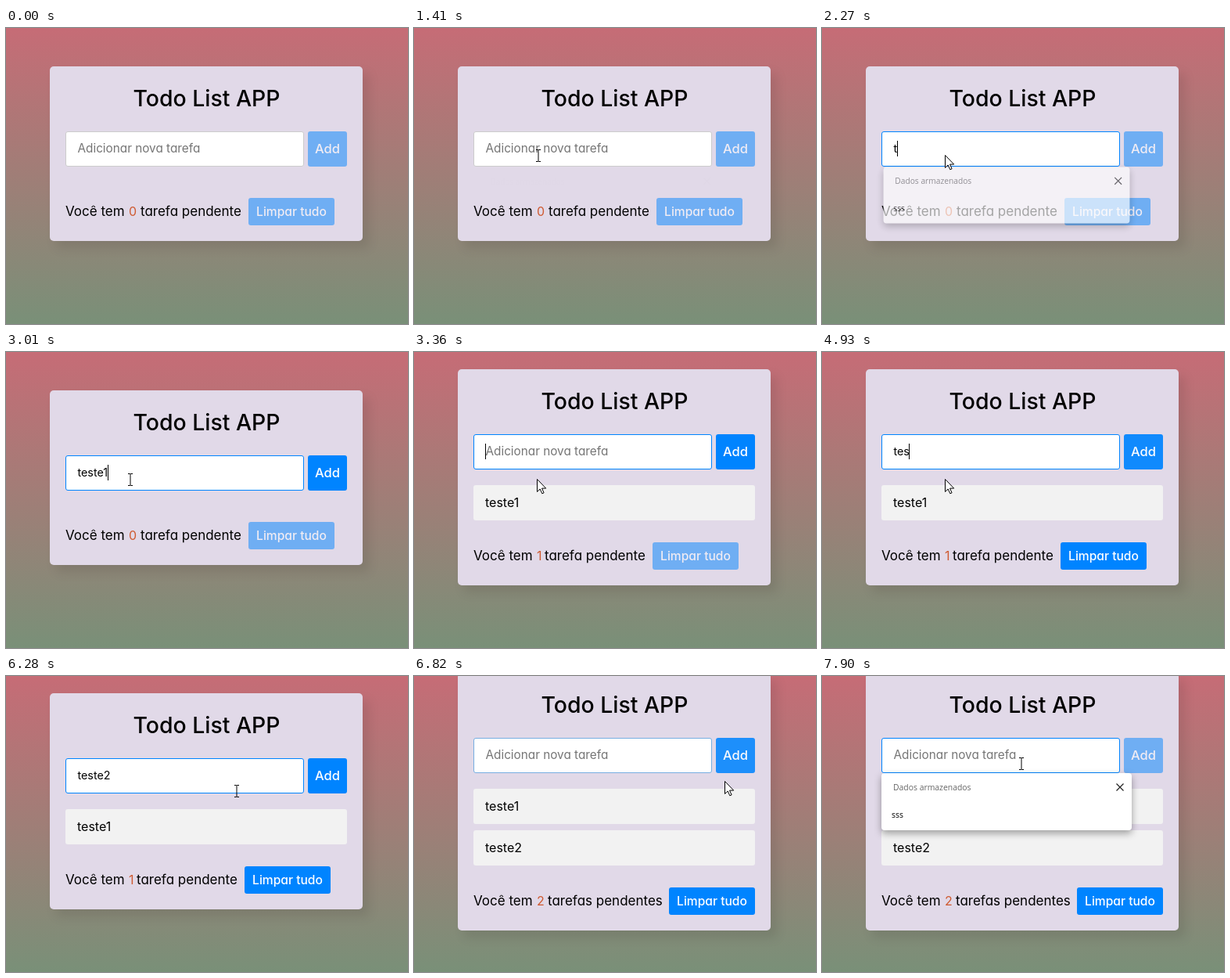
Write an HTML page that moves like this. It is 514 by 378 pixels and loops after 8 s.

```html
<!DOCTYPE html>
<html lang="pt-BR">
<head>
<meta charset="utf-8">
<title>Todo List APP</title>
<style>
  html, body { margin: 0; width: 100%; height: 100%; overflow: hidden; }
  svg { display: block; width: 514px; height: 378px; background: linear-gradient(#c66c76, #799078); }
  /* cv11 is the single-storey "a" */
  text { font: 17px Inter, sans-serif; font-optical-sizing: none; font-feature-settings: "cv11"; white-space: pre; }
  .panel { fill: #e1d9e8; filter: drop-shadow(8px 9px 6.5px rgba(0, 0, 0, .09)); }
  .title { font-size: 28.4px; font-weight: 500; text-anchor: middle; }
  .hint { font-size: 15.3px; fill: #757575; }
  .typed { font-size: 14.3px; }
  .item rect { fill: #f2f2f2; }
  .item text { font-size: 16px; }
  .btn rect { fill: #0084ff; }
  .btn text { fill: #fff; text-anchor: middle; font-size: 16.5px; font-weight: 500; }
  .btn .small { font-size: 15.6px; }
  #footer .count { fill: #cf5a30; font-size: 16px; }
  .menu { fill: #fff; filter: drop-shadow(0 4px 5px rgba(0, 0, 0, .35)); }
  #popup text { font: 10.4px "Open Sans", sans-serif; }
  #popup .label { fill: #666; }
  #arrow, #hand { fill: #fff; stroke: #000; stroke-linejoin: round; }
  #beam { fill: none; stroke: #000; }
</style>
</head>
<body>
<svg viewBox="0 0 514 378">
  <g id="card">
    <rect id="panel" class="panel" x="56" width="400" rx="5"/>
    <text class="title" x="256.5" y="51">Todo List APP</text>
    <rect id="field" x="76.5" y="83.5" width="304" height="44" rx="2.5" fill="#fff"/>
    <text id="hint" class="hint" x="91.5" y="110">Adicionar nova tarefa</text>
    <text id="typed" class="typed" x="91.5" y="110"></text>
    <rect id="caret" y="95" width="1" height="20"/>
    <g id="add" class="btn">
      <rect x="386" y="83" width="50" height="45" rx="3"/>
      <text x="411" y="111">Add</text>
    </g>
    <g id="item1" class="item" transform="translate(76 148)">
      <rect width="360" height="45" rx="3"/><text x="15" y="28">teste1</text>
    </g>
    <g id="item2" class="item" transform="translate(76 201)">
      <rect width="360" height="45" rx="3"/><text x="15" y="28">teste2</text>
    </g>
    <g id="footer">
      <text x="76" y="23">Você tem</text>
      <text id="count" class="count" x="157" y="23"></text>
      <text id="pending" y="23"></text>
      <g id="clear" class="btn">
        <rect width="110" height="35" rx="3"/>
        <text class="small" x="55" y="23">Limpar tudo</text>
      </g>
    </g>
    <g id="popup">
      <rect class="menu" x="76" y="128" width="320" height="73" rx="4"/>
      <text class="label" x="91" y="150">Dados armazenados</text>
      <text x="89" y="185">sss</text>
      <path d="M376.5 141.5l9 9m0-9l-9 9" stroke="#222" stroke-width="1.2"/>
    </g>
  </g>
  <g id="cursor">
    <path id="arrow" d="M.5.5v16l3.7-3.5 2.6 5.8 2.3-1-2.6-5.7h5.2z"/>
    <path id="beam" d="M-1-6.5h2.5l.5.5.5-.5h2.5M2-6v14M-1 8.5h2.5l.5-.5.5.5h2.5"/>
    <path id="hand" d="M-1 1.5q1.5-2 3 0v6q5-1 8 2v5l-2 5h-7l-6-8q1-2 4 0z"/>
  </g>
</svg>
<script>
const LOOP = 8000, BLINK = 520;
const SUBMITS = [3360, 6765];
const WORDS = [
  { text: 'teste1', keys: [2210, 2340, 2410, 2540, 2680, 3010] },
  { text: 'teste2', keys: [4580, 4790, 4930, 5000, 5070, 5600] }
];
const FOCUS = 1410, BLUR = 6720, REFOCUS = 7370;
const CARET_STARTS = [FOCUS + 80, ...WORDS[0].keys, ...WORDS[1].keys, REFOCUS + 10];
const FOOTERS = [
  { tail: 172, button: 310, label: 'tarefa pendente' },
  { tail: 167, button: 305, label: 'tarefa pendente' },
  { tail: 171, button: 326, label: 'tarefas pendentes' }
];
const PATH = [
  [330, 312, 372], [870, 154, 166], [1010, 157, 162],
  [6020, 157, 162], [6500, 397, 134], [6830, 397, 134], [7170, 253, 111]
];

const $ = id => document.getElementById(id);
const set = (id, attrs) => {
  for (const key in attrs) $(id).setAttribute(key, attrs[key]);
};
const show = (id, on) => { $(id).style.display = on ? '' : 'none'; };
const clamp = v => Math.min(1, Math.max(0, v));
const mix = (a, b, p) => a + (b - a) * p;
const bezier = (a, b, s) => 3 * a * s * (1 - s) ** 2 + 3 * b * s * s * (1 - s) + s ** 3;

// CSS "ease": solve x(s) = p, return y(s)
function ease(p) {
  p = clamp(p);
  if (p === 0 || p === 1) return p;
  let low = 0, high = 1;
  for (let i = 0; i < 20; i++) {
    const mid = (low + high) / 2;
    if (bezier(.25, .25, mid) < p) low = mid; else high = mid;
  }
  return bezier(.1, 1, low);
}
const pulse = (t, on, off, dur = 300, curve = ease) =>
  curve((t - on) / dur) - curve((t - off) / dur);

function cursorAt(t) {
  let i = 0;
  while (i < PATH.length - 2 && t >= PATH[i + 1][0]) i++;
  const [t0, x0, y0] = PATH[i], [t1, x1, y1] = PATH[i + 1];
  const p = clamp((t - t0) / (t1 - t0)), s = p * p * (3 - 2 * p);
  return [mix(x0, x1, s), mix(y0, y1, s)];
}

function typedAt(t, done) {
  const word = WORDS[done];
  return word ? word.text.slice(0, word.keys.filter(k => k <= t).length) : '';
}

function drawField(t, done) {
  const text = typedAt(t, done);
  $('typed').textContent = text;
  show('hint', !text);
  const glow = pulse(t, FOCUS, BLUR) + ease((t - REFOCUS) / 250);
  const rgb = [mix(204, 0, glow), mix(204, 132, glow), mix(204, 255, glow)].map(Math.round);
  set('field', { stroke: `rgb(${rgb})` });

  const start = CARET_STARTS.filter(s => s <= t).pop();
  const focused = t < BLUR || t >= REFOCUS;
  show('caret', focused && start !== undefined && Math.floor((t - start) / BLINK) % 2 === 0);
  const width = text ? $('typed').getComputedTextLength() : 0;
  set('caret', { x: 91 + Math.round(width) });
}

function drawPopup(t) {
  const a = pulse(t, FOCUS, 2200, 200, clamp) + clamp((t - REFOCUS) / 200);
  const k = mix(.955, 1, a);
  show('popup', a > 0);
  set('popup', { opacity: a, transform: `translate(236 164.5) scale(${k}) translate(-236 -164.5)` });
}

function drawCursor(t, top, enabled) {
  const [x, y] = cursorAt(t);
  const inRow = y >= top + 83 && y < top + 128;
  const closing = t >= 2210 && t < 2410;
  const kind = inRow && x >= 76 && x < 381 && !closing ? 'beam'
    : inRow && x >= 386 && x < 436 && enabled ? 'hand' : 'arrow';
  for (const id of ['arrow', 'beam', 'hand']) show(id, id === kind);
  show('cursor', t >= 330);
  set('cursor', { transform: `translate(${Math.round(x)} ${Math.round(y)})` });
}

function draw(t) {
  const done = SUBMITS.filter(s => s <= t).length;
  const height = 223 + 53 * done, top = Math.floor(160.5 - height / 2);
  const foot = FOOTERS[done];
  set('card', { transform: `translate(0 ${top})` });
  set('panel', { height });
  show('item1', done > 0);
  show('item2', done > 1);

  set('footer', { transform: `translate(0 ${168 + 53 * done})` });
  $('count').textContent = done;
  $('pending').textContent = foot.label;
  set('pending', { x: foot.tail });
  const ready = pulse(t, 2360, SUBMITS[0]) + pulse(t, 4765, SUBMITS[1]);
  set('add', { opacity: .5 + .5 * ready });
  set('clear', {
    transform: `translate(${foot.button} 0)`,
    opacity: .5 + .5 * ease((t - SUBMITS[0]) / 300)
  });

  drawField(t, done);
  drawPopup(t);
  drawCursor(t, top, typedAt(t, done) !== '');
}

const begin = performance.now();
function tick() {
  draw((performance.now() - begin) % LOOP);
  requestAnimationFrame(tick);
}
tick();
</script>
</body>
</html>
```
